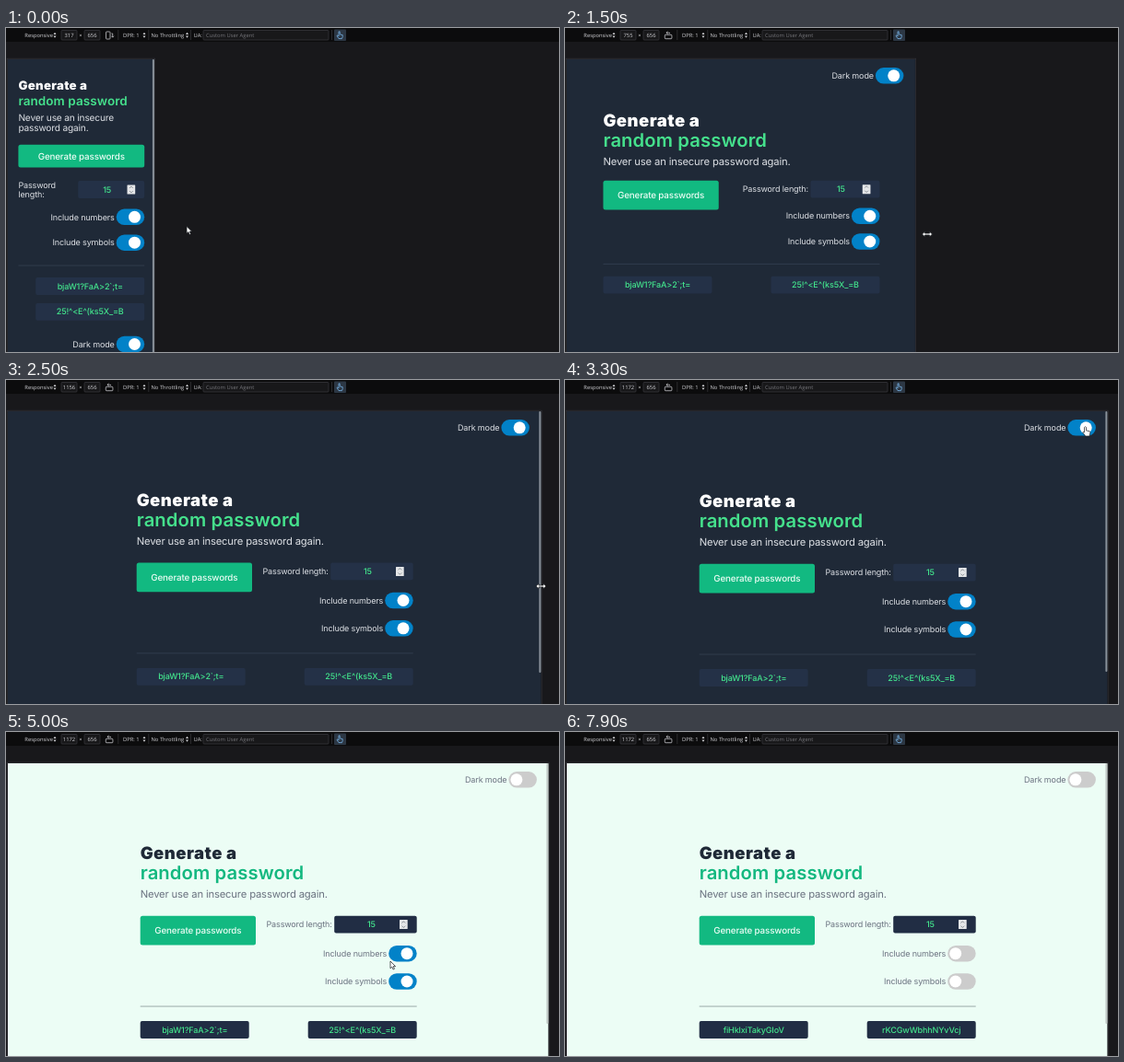
An HTML page for the animation above (8000 ms loop, 600x352 px).

```html
<!DOCTYPE html>
<html lang="en">
<head>
<meta charset="utf-8">
<title>Password generator</title>
<style>
html, body { margin: 0; width: 100%; height: 100%; overflow: hidden; background: #18181b; }
svg { display: block; font-family: Inter, "Open Sans", sans-serif; text-rendering: geometricPrecision; }
.bar { font-family: "Open Sans", "Noto Sans", sans-serif; }
</style>
</head>
<body>
<svg id="stage" width="600" height="352" viewBox="0 0 600 352"></svg>
<script>
const LOOP = 8000, STEP = 100;
const DARK_OFF = 3780, NUMBERS_OFF = 5300, SYMBOLS_OFF = 5800;
const TIGHT = -.0145;
const stage = document.getElementById('stage');

// Viewport width in CSS pixels; the page is drawn at half scale.
const WIDTHS = [[0, 317], [550, 317], [900, 372], [1200, 520], [1500, 755],
  [1800, 1035], [2000, 1100], [2400, 1150], [2800, 1172]];
const POINTER = [[0, 196, 215.5], [150, 190, 217], [450, 161, 223], [600, 163, 224],
  [900, 195, 224], [1200, 282, 224], [1500, 393, 224], [1800, 531, 224],
  [2000, 552.5, 224], [2400, 578, 224], [2800, 588, 224], [2900, 591, 195],
  [3200, 567, 62], [3300, 564.5, 50.5], [3850, 563, 51], [4150, 540, 80],
  [4700, 440, 225], [5000, 417, 249], [5250, 429, 241], [5400, 429, 241],
  [5700, 430, 270], [5900, 430, 270], [6300, 180, 219], [7400, 180, 217], [7800, 553, 50]];
const PASSWORDS = [
  [0, 'bjaW1?FaA>2`;t=', '25!^<E^(ks5X_=B'],
  [6700, 'QmdoLRzeuaPwHtn', 'hTsVbyKfeJoXraN'],
  [7350, 'fiHklxiTakyGIoV', 'rKCGwWbhhNYvVcj']];

function track(keys, t, col = 1) {
  const i = keys.findIndex(k => k[0] > t);
  if (i < 0) return keys[keys.length - 1][col];
  const a = keys[i - 1], b = keys[i];
  return a[col] + (b[col] - a[col]) * (t - a[0]) / (b[0] - a[0]);
}

// CSS "ease" curve, solved by bisection.
function ease(x) {
  if (x <= 0) return 0;
  if (x >= 1) return 1;
  const bez = (s, p, q) => 3 * s * (1 - s) ** 2 * p + 3 * s * s * (1 - s) * q + s ** 3;
  let lo = 0, hi = 1;
  for (let i = 0; i < 20; i++) {
    const m = (lo + hi) / 2;
    if (bez(m, .25, .25) < x) lo = m; else hi = m;
  }
  return bez(lo, .1, 1);
}

const mix = (a, b, p) => `rgb(${a.map((v, i) => Math.round(v + (b[i] - v) * p))})`;
const esc = s => s.replace(/&/g, '&amp;').replace(/</g, '&lt;').replace(/>/g, '&gt;');
const rect = (x, y, w, h, fill, r = 0, extra = '') =>
  `<rect x="${x}" y="${y}" width="${w}" height="${h}" rx="${r}" fill="${fill}" ${extra}/>`;
const path = (d, extra) => `<path d="${d}" ${extra}/>`;
const text = (s, x, y, size, fill, anchor = 'start', weight = 400, spacing = TIGHT) =>
  `<text x="${x}" y="${y}" font-size="${size}" fill="${fill}" text-anchor="${anchor}" ` +
  `font-weight="${weight}" letter-spacing="${spacing}em">${esc(s)}</text>`;

function toggle(label, right, y, on, color) {
  return text(label, right - 32.5, y + 3.2, 9, color, 'end') +
    rect(right - 30.5, y - 8.7, 30.5, 17.4, mix([204, 204, 204], [2, 130, 200], on), 8.7) +
    `<circle cx="${right - 22 + 11.3 * on}" cy="${y}" r="6.5" fill="#fff"/>`;
}

function toolbar(w) {
  const ink = '#d2d2d6', line = 'fill="none" stroke="#c4c4c8" stroke-width=".8"';
  const label = (s, x, anchor, fill = ink) => text(s, x, 10.3, 5.8, fill, anchor, 400, 0);
  const field = (x, wd) => rect(x, 2.5, wd, 10.5, '#18181a', 1, 'stroke="#3c3c41" stroke-width=".7"');
  const arrows = x => path(`M${x - 1.5} 7l1.5-2.2l1.5 2.2zM${x - 1.5} 8.6l1.5 2.2l1.5-2.2z`, `fill="${ink}"`);
  const rotate = w < 656
    ? rect(108.5, 4, 4.5, 8, 'none', .8, line) + path('M114.5 6h1.2v4m-1.3-1.3l1.3 1.5l1.3-1.5', line)
    : rect(108.3, 7.3, 7.6, 4.4, 'none', .8, line) + path('M110 5.2h3.5v1m-2-2.3l-1.6 1.3l1.6 1.3', line);
  const hand = path('M361 11.5l-2-3l1-.6l1 1v-5h1.2v3l3 .7v2l-.8 2z',
    'fill="none" stroke="#79b4e8" stroke-width=".8"');
  return '<g class="bar">' + rect(0, 0, 600, 15, '#0c0c0d') +
    label('Responsive', 20.3) + arrows(53) +
    field(60, 17) + label(w, 68.5, 'middle') + label('×', 81, 'middle') +
    field(85, 17) + label('656', 93.5, 'middle') + rotate +
    [121.5, 154.5, 200, 353].map(x => rect(x, 2, .7, 11, '#38383d')).join('') +
    label('DPR: 1', 127) + arrows(150) + label('No Throttling', 157.5) + arrows(196.5) +
    label('UA:', 203.5) + field(214, 136) + label('Custom User Agent', 217, 'start', '#77777c') +
    rect(356, 1.5, 13, 12.5, '#2c3744', 1) + hand + '</g>';
}

function layout(w) {
  const edge = 2.4 + w / 2;
  if (w < 640) {
    const right = edge - 10.7, left = 13.4;
    return { small: true, edge, left, right, wrap: right - left < 190, head: 66.7, title: 84.2,
      sub: 100.5, btn: 126.8, btnW: right - left, btnH: 24.8, len: 175.5, inputW: 72,
      num: 205.3, sym: 233.2, rule: 258, pass: [280.5, 308.3], dark: 343.5, darkRight: right,
      thumb: 320 };
  }
  const big = w >= 1024 ? 1 : 0, head = .075 * w + 50.3;
  const btn = head + 58.8 + 2.7 * big, mid = 2.7 + w / 4;
  const pass = btn + 113.4 + 10.4 * big;
  return { edge, left: mid - 150, right: mid + 150, head, title: head + 22.2, sub: head + 41.8,
    btn, btnW: 125.3, btnH: 31.8, len: btn + 9.4, inputW: big ? 89.5 : 75,
    num: btn + 38.5 + 2.5 * big, sym: btn + 66.3 + 5 * big, rule: btn + 90.6 + 7.7 * big,
    pass: [pass, pass], dark: 51.8, darkRight: edge - 12.5,
    thumb: big ? 287 - .055 * (w - 1100) : 0 };
}

function page(t, w) {
  const L = layout(w), light = t >= DARK_OFF;
  const fade = ease((t - DARK_OFF) / 320);
  const on = start => 1 - ease((t - start) / 400);
  const body = light ? '#6b7280' : '#dde0e5';
  const strong = light ? '#1f2937' : '#fff', accent = light ? '#14b880' : '#45e08c';
  const box = light ? '#212d44' : '#243147', glow = '#43e68d';
  const { left, right } = L, inputX = right - L.inputW;
  const lines = (parts, x, y, gap, size, anchor) =>
    parts.map((s, i) => text(s, x, y + i * gap, size, body, anchor)).join('');
  const hover = t >= 6200 && t < 7500;

  let out = rect(1.2, 33.2, L.edge - .4, 330, '#18181b', 0, 'stroke="#34343a" stroke-width=".7"') +
    rect(2, 34, L.edge - 2, 330, mix([31, 41, 55], [236, 253, 245], fade));
  if (L.thumb) out += rect(L.edge - 2, 34, 2, L.thumb, light ? '#c2cac7' : '#89919a', 1);

  out += text('Generate a', left, L.head, L.small ? 13.2 : 18.5, strong, 'start', 900, .025) +
    text('random password', left, L.title, L.small ? 13.5 : 20.25, accent, 'start', 600, .005);
  out += lines(L.wrap ? ['Never use an insecure', 'password again.'] : ['Never use an insecure password again.'],
    left, L.sub, 11, L.small ? 10.1 : 11.25);
  out += rect(left, L.btn, L.btnW, L.btnH, hover ? '#0fb07a' : '#12b981', 2.5) +
    text('Generate passwords', left + L.btnW / 2, L.btn + L.btnH / 2 + 3.5, 9.8, '#ecfdf5', 'middle', 500);

  out += L.wrap
    ? lines(['Password', 'length:'], left, L.len - 1.8, 10.7, 9)
    : lines(['Password length:'], inputX - 2.5, L.len + 3.2, 0, 9, 'end');
  out += rect(inputX, L.len - 9.4, L.inputW, 18.8, box, 2) +
    text('15', inputX + L.inputW / 2 - 4.6, L.len + 3.3, 9, glow, 'middle', 500) +
    rect(right - 18.7, L.len - 5, 8.7, 10, '#e4e6e8', .5) +
    path(`M${right - 16.1} ${L.len - 1.6}l1.8-1.8l1.8 1.8m-3.6 3.2l1.8 1.8l1.8-1.8`,
      'fill="none" stroke="#777d84" stroke-width=".8"');

  out += toggle('Include numbers', right, L.num, on(NUMBERS_OFF), body) +
    toggle('Include symbols', right, L.sym, on(SYMBOLS_OFF), body) +
    rect(left, L.rule - .4, right - left, .9, mix([50, 62, 79], [145, 160, 160], fade));

  const words = PASSWORDS.filter(p => p[0] <= t).pop();
  [L.small ? right - 118 : left, right - 118].forEach((x, i) => {
    out += rect(x, L.pass[i] - 9.4, 118, 18.8, box, 2) +
      text(words[i + 1], x + 59, L.pass[i] + 3.1, 9, glow, 'middle', 500);
  });
  return out + toggle('Dark mode', L.darkRight, L.dark, on(DARK_OFF), body);
}

function pointer(t) {
  if (t >= 3850 && t < 4150 || t >= 7800) return '';
  const within = (a, b) => t >= a && t < b;
  const resize = within(450, 2850);
  const hand = within(3200, 4300) || within(5200, 5500) || within(5650, 6000) || within(6200, 7450);
  const shape = resize ? 'M-5.5 0l3-2.7v1.8h5v-1.8l3 2.7l-3 2.7v-1.8h-5v1.8z'
    : hand ? 'M-1 1q1-1.6 2 0v3.3l3.6.9q1 .3.8 1.5l-.8 3.8h-4.4l-3-4q.2-1.3 1.8-.2z'
    : 'M0 0v7.8l1.8-1.7l1.3 2.9l1.4-.7l-1.3-2.7h2.4z';
  return `<g transform="translate(${track(POINTER, t)} ${track(POINTER, t, 2)})">` +
    path(shape, 'fill="#fff" stroke="#15181c" stroke-width=".7" stroke-linejoin="round"') + '</g>';
}

let shown = -1;
function draw(now) {
  const t = Math.floor(now % LOOP / STEP) * STEP;
  if (t !== shown) {
    const w = Math.round(track(WIDTHS, t));
    stage.innerHTML = rect(0, 0, 600, 352, '#18181b') + toolbar(String(w)) + page(t, w) + pointer(t);
    shown = t;
  }
}

const start = performance.now();
function tick() {
  draw(performance.now() - start);
  requestAnimationFrame(tick);
}
tick();
</script>
</body>
</html>
```
